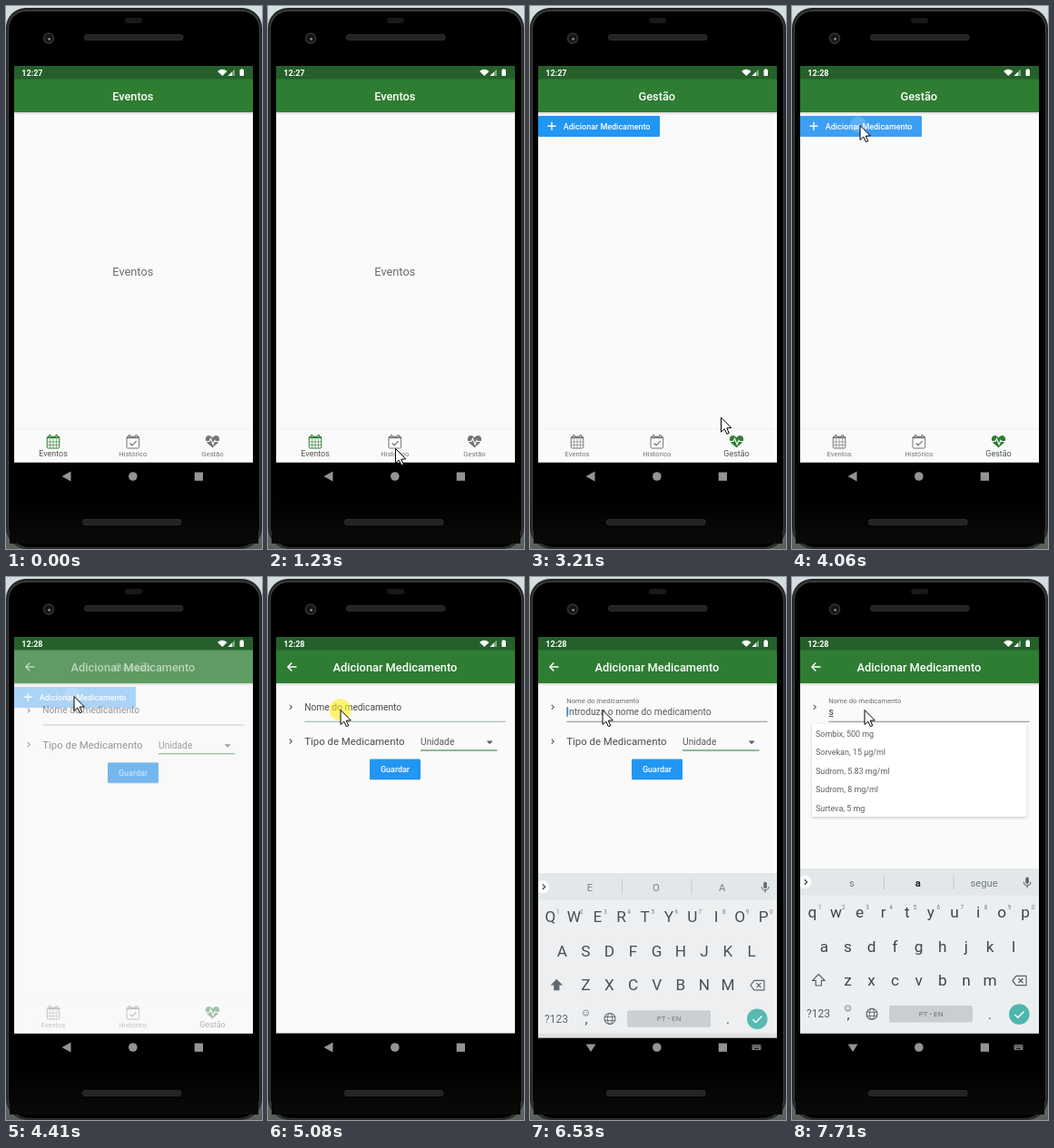
An HTML page with a canvas that plays this animation: 282 px wide and 598 px high, repeating every 8 s.

```html
<!DOCTYPE html>
<html lang="pt">
<head>
<meta charset="utf-8">
<title>Eventos</title>
<style>
html, body { margin: 0; width: 100%; height: 100%; overflow: hidden; background: #000; }
canvas { display: block; width: 282px; height: 598px; }
</style>
</head>
<body>
<canvas id="stage"></canvas>
<script>
const W = 282, H = 598, LOOP = 8000;
const canvas = document.getElementById('stage');
const ctx = canvas.getContext('2d');
const ratio = window.devicePixelRatio || 1;
canvas.width = W * ratio;
canvas.height = H * ratio;

const GREEN = '#2e7d32', PAGE = '#fafafa', BLUE = '#2196f3', GREY = '#757575';
const clamp = v => Math.max(0, Math.min(1, v));
const mix = (a, b, p) => a + (b - a) * p;
const span = (t, a, b) => clamp((t - a) / (b - a));
const easeOut = p => 1 - (1 - p) ** 3;
const easeInOut = p => p * p * (3 - 2 * p);

// ---------- drawing helpers ----------
function rect(x, y, w, h, color) {
  ctx.fillStyle = color;
  ctx.fillRect(x, y, w, h);
}
function round(x, y, w, h, r, color) {
  ctx.beginPath();
  ctx.roundRect(x, y, w, h, r);
  ctx.fillStyle = color;
  ctx.fill();
}
function disc(x, y, r, color) {
  ctx.beginPath();
  ctx.arc(x, y, r, 0, Math.PI * 2);
  ctx.fillStyle = color;
  ctx.fill();
}
function trace(points, close) {
  ctx.beginPath();
  points.forEach(([x, y]) => ctx.lineTo(x, y));
  if (close) ctx.closePath();
}
function poly(points, color) {
  trace(points, true);
  ctx.fillStyle = color;
  ctx.fill();
}
function line(points, color, width = 1) {
  trace(points);
  ctx.strokeStyle = color;
  ctx.lineWidth = width;
  ctx.stroke();
}
function ring(x, y, rx, ry, color, width = 1) {
  ctx.beginPath();
  ctx.ellipse(x, y, rx, ry, 0, 0, Math.PI * 2);
  ctx.strokeStyle = color;
  ctx.lineWidth = width;
  ctx.stroke();
}
function text(str, x, y, size, color, weight = 400, align = 'left') {
  ctx.font = `${weight} ${size}px Roboto, sans-serif`;
  ctx.textAlign = align;
  ctx.fillStyle = color;
  ctx.fillText(str, x, y);
}
function fade(x, y, w, h, from, to) {
  const g = ctx.createLinearGradient(0, y, 0, y + h);
  g.addColorStop(0, from);
  g.addColorStop(1, to);
  rect(x, y, w, h, g);
}
const chevron = (x, y, color, s = 2.5) =>
  line([[x - s / 2, y - s], [x + s / 2, y], [x - s / 2, y + s]], color, 1.2);

// ---------- phone ----------
function drawPhone() {
  fade(0, 0, W, H, '#d3dfe0', '#59605b');
  round(0, 2, 282, 596, [22, 22, 24, 24], '#262626');
  round(2, 4.5, 278, 592, [20, 20, 22, 22], '#3c403d');
  round(3, 6, 276, 590, [19, 19, 22, 22], '#000');
  fade(4, 540, 274, 52, '#000', '#0a0a0a');
  round(131, 13, 19, 6, 3, '#191919');
  for (const [x, y] of [[86, 31], [84, 565]]) {
    round(x, y, 109.5, 7, 3.5, '#2c2c2c');
    round(x + 1, y + 1, 107.5, 5, 2.5, '#232323');
  }
  disc(47, 35.5, 6.3, '#303030');
  disc(47, 35.5, 4.6, '#151515');
  disc(47.6, 36.4, 1.4, '#888');
}

function drawStatus(t) {
  rect(9, 66, 263, 14.5, '#255f2a');
  text(t < 3600 ? '12:27' : '12:28', 17.3, 76.6, 9, '#fff', 700);
  ctx.beginPath();
  ctx.moveTo(238.3, 77);
  ctx.arc(238.3, 77, 7.2, -Math.PI * 0.76, -Math.PI * 0.24);
  ctx.fillStyle = '#fff';
  ctx.fill();
  poly([[244.5, 77], [252, 69.5], [252, 77]], '#7fa582');
  poly([[244.5, 77], [249, 72.5], [249, 77]], '#fff');
  round(257.5, 70, 4.5, 7, 0.8, '#fff');
  rect(258.8, 69.2, 1.9, 1, '#fff');
}

function drawBar(title, x, align) {
  rect(9, 80, 263, 37, GREEN);
  fade(9, 117, 263, 3, 'rgba(0,0,0,.15)', 'rgba(0,0,0,0)');
  text(title, x, 103.7, 12.8, '#fff', 500, align);
}

function drawSystemNav(typing) {
  const c = '#949494';
  if (typing) {
    poly([[61.5, 514.5], [72.5, 514.5], [67, 523]], c);
    round(244.5, 515, 10, 6, 1, '#777');
    for (let i = 0; i < 4; i++) rect(245.6 + i * 2.3, 516.2, 1, 1, '#111');
    rect(247, 518.8, 5, 1, '#111');
  } else {
    poly([[61.5, 518], [71.5, 512.5], [71.5, 523.5]], c);
  }
  disc(139.8, 518, 4.8, c);
  rect(207.7, 513.5, 9.3, 9.3, c);
}

// ---------- tabs ----------
function calendar(x, y, color) {
  ctx.strokeStyle = color;
  ctx.lineWidth = 1;
  ctx.beginPath();
  ctx.roundRect(x - 6.8, y - 5.3, 13.6, 12.8, 1.2);
  ctx.stroke();
  rect(x - 6.8, y - 5.3, 13.6, 2, color);
  for (const dx of [-3.7, 3.7]) {
    round(x + dx - 1.3, y - 7.5, 2.6, 4, 1, color);
    rect(x + dx - 0.4, y - 6.6, 0.8, 2.2, '#ddd');
  }
}
function gridIcon(x, y, color) {
  calendar(x, y, color);
  for (const d of [-3.4, 0, 3.4]) line([[x + d, y - 3], [x + d, y + 7]], color, 0.6);
  for (const d of [0.5, 4]) line([[x - 6.5, y + d], [x + 6.5, y + d]], color, 0.6);
}
function checkIcon(x, y, color) {
  calendar(x, y, color);
  line([[x - 3.2, y + 2], [x - 0.8, y + 4.3], [x + 3.8, y - 0.4]], color, 1.2);
}
function heartIcon(x, y, color) {
  ctx.beginPath();
  ctx.moveTo(x, y + 7);
  ctx.bezierCurveTo(x - 4, y + 3, x - 8, y + 1, x - 7.6, y - 3);
  ctx.bezierCurveTo(x - 7, y - 7.5, x - 2, y - 7.5, x, y - 4);
  ctx.bezierCurveTo(x + 2, y - 7.5, x + 7, y - 7.5, x + 7.6, y - 3);
  ctx.bezierCurveTo(x + 8, y + 1, x + 4, y + 3, x, y + 7);
  ctx.fillStyle = color;
  ctx.fill();
  line([[x - 8, y], [x - 3.6, y], [x - 2, y - 3], [x + 0.6, y + 3.4], [x + 2.4, y - 1], [x + 3.2, y], [x + 8, y]], PAGE, 1.2);
}
const TABS = [
  { name: 'Eventos', x: 52, icon: gridIcon, from: -500, to: 1530 },
  { name: 'Histórico', x: 139.8, icon: checkIcon, from: 1530, to: 2740 },
  { name: 'Gestão', x: 227.5, icon: heartIcon, from: 2740, to: 9000 }
];

function drawTabs(t) {
  rect(9, 466, 263, 37, PAGE);
  rect(9, 465, 263, 1, '#f1f1f1');
  for (const tab of TABS) {
    const on = easeOut(span(t, tab.from, tab.from + 190)) - easeOut(span(t, tab.to, tab.to + 190));
    tab.icon(tab.x, 479.5, on > 0.5 ? GREEN : GREY);
    text(tab.name, tab.x, 496, mix(7.68, 8.96, on), on > 0.5 ? '#4d584e' : GREY, 400, 'center');
  }
}

function drawHome(t) {
  const tab = TABS.find(k => t >= k.from && t < k.to);
  rect(9, 80, 263, 423, PAGE);
  drawBar(tab.name, 139.8, 'center');
  if (tab.name === 'Gestão') {
    const pressed = t >= 4010;
    round(9, 121, 134, 23, 1, pressed ? '#3c9ff4' : BLUE);
    if (pressed) disc(73, 130.5, mix(4, 9, span(t, 4000, 4060)), 'rgba(255,255,255,.18)');
    line([[19.5, 132.3], [28.5, 132.3]], '#fff', 1.4);
    line([[24, 127.8], [24, 136.8]], '#fff', 1.4);
    text('Adicionar Medicamento', 36.8, 135.5, 8.96, '#fff', 500);
  } else {
    text(tab.name, 139.8, 296.8, 12.8, '#667068', 400, 'center');
  }
  drawTabs(t);
}

// ---------- form ----------
const MEDICINES = ['Sombix, 500 mg', 'Sorvekan, 15 µg/ml', 'Sudrom, 5.83 mg/ml', 'Sudrom, 8 mg/ml', 'Surteva, 5 mg'];

function drawForm(t, slide) {
  rect(9, 80, 263, 423, PAGE);
  ctx.save();
  ctx.translate(0, slide);
  drawNameField(t);
  drawTypeField();
  if (t >= 7520) drawOptions();
  ctx.restore();

  drawBar('Adicionar Medicamento', 71.6, 'left');
  line([[31.5, 99], [22, 99]], '#fff', 1.4);
  line([[26.3, 94.5], [21.8, 99], [26.3, 103.5]], '#fff', 1.4);
}

function drawNameField(t) {
  const float = easeInOut(span(t, 5560, 5860));
  const typed = t >= 7270;
  chevron(25, 143.3, '#666');
  text('Nome do medicamento', 40.2, mix(146.8, 139.4, float), mix(10.24, 7.68, float), float < 0.5 ? '#4c4c4c' : '#6c6c6c');
  rect(40.5, 158.7, 221, 1.3, t < 5810 ? '#a9c0ab' : '#a0a0a0');
  if (typed) {
    text('s', 40.6, 152, 10.24, '#333');
    rect(40.6, 153, 5, 0.8, '#333');
  } else if (t >= 5630) {
    ctx.save();
    ctx.globalAlpha *= float;
    text('Introduza o nome do medicamento', 40.2, 152, 10.24, '#5a5a5a');
    ctx.restore();
  }
  const caret = (t >= 5390 && t < 6130) || (t >= 6460 && t < 7120) || (typed && t < 7710);
  if (caret) rect(typed ? 45.4 : 40.3, 143, 1.4, 11, '#4a7fe0');
}

function drawTypeField() {
  chevron(25, 181, '#666');
  text('Tipo de Medicamento', 40.2, 185.3, 11.4, '#4c4c4c');
  text('Unidade', 168, 185, 10.24, '#5a5a5a');
  poly([[240.8, 180.5], [247.6, 180.5], [244.2, 184]], '#555');
  rect(168, 190.3, 84.5, 1.3, '#5f8f62');
  round(112, 201.5, 56, 22.5, 1.2, 'rgba(0,0,0,.14)');
  round(112, 200.5, 56, 22.5, 1.2, BLUE);
  text('Guardar', 140, 215, 8.96, '#fff', 500, 'center');
}

function drawOptions() {
  ctx.save();
  ctx.shadowColor = 'rgba(0,0,0,.22)';
  ctx.shadowBlur = 3 * ratio;
  ctx.shadowOffsetY = ratio;
  round(22, 162, 236.5, 102, 1, '#fff');
  ctx.restore();
  MEDICINES.forEach((name, i) => text(name, 26, 175.7 + i * 20.5, 8.96, '#606060'));
}

// ---------- keyboard ----------
const INK = '#3c474c', PITCH = 26.1;
const ROWS = [['qwertyuiop', 22.3, 375], ['asdfghjkl', 35.3, 412.6], ['zxcvbnm', 61.4, 450]];

function drawKeyboard(t) {
  const p = span(t, 6430, 6620);
  const drop = 36 * (1 - p) ** 2.6;
  const lower = t >= 7350;
  ctx.save();
  ctx.globalAlpha = clamp(1.05 - drop / 50);
  ctx.translate(0, drop);
  rect(9, 321, 263, 181.5, '#eceff1');
  rect(9, 321, 263, 29.5, '#e2e7ea');

  const words = t >= 7440 ? ['s', 'a', 'segue'] : ['E', 'O', 'A'];
  words.forEach((word, i) => {
    const main = word === 'a';
    text(word, 66 + i * 72.8, 340.6, 11.2, main ? '#222' : '#737b80', main ? 700 : 400, 'center');
  });
  for (const x of [101, 177.5]) rect(x, 328, 1, 16, '#c3c9cc');
  ctx.save();
  ctx.beginPath();
  ctx.rect(9, 321, 30, 30);
  ctx.clip();
  disc(14.2, 336, 7.2, '#fff');
  ctx.restore();
  chevron(15.2, 336, '#333', 2.8);
  round(257.2, 330.5, 3.8, 7.4, 1.9, '#5f686d');
  ctx.beginPath();
  ctx.arc(259.1, 335.8, 3.9, 0, Math.PI);
  ctx.strokeStyle = '#5f686d';
  ctx.lineWidth = 1.1;
  ctx.stroke();
  rect(258.5, 339.5, 1.2, 2.8, '#5f686d');

  for (const [keys, x, y] of ROWS) {
    [...keys].forEach((k, i) =>
      text(lower ? k : k.toUpperCase(), x + i * PITCH, y, 17.2, INK, 400, 'center'));
  }
  for (let i = 0; i < 10; i++) {
    text((i + 1) % 10, 30.8 + i * PITCH, 366.2, 6.4, '#727b80', 400, 'center');
  }

  const shift = [[29.3, 437.5], [36, 444.4], [32.4, 444.4], [32.4, 450], [26.2, 450], [26.2, 444.4], [22.6, 444.4]];
  if (lower) line([...shift, shift[0]], '#566167', 1.2);
  else poly(shift, '#566167');
  line([[242.8, 444.5], [247, 439.3], [258, 439.3], [258, 449.7], [247, 449.7], [242.8, 444.5]], '#566167', 1.2);
  line([[249.5, 442], [254.5, 447]], '#566167', 1.2);
  line([[254.5, 442], [249.5, 447]], '#566167', 1.2);

  text('?123', 29, 485.4, 12, '#566167', 400, 'center');
  text(',', 62, 486.5, 15, INK, 400, 'center');
  ring(61.5, 475, 3.2, 3.2, '#727b80', 0.8);
  rect(60, 473.8, 0.9, 0.9, '#727b80');
  rect(62.2, 473.8, 0.9, 0.9, '#727b80');
  line([[60, 476.2], [61.5, 477], [63, 476.2]], '#727b80', 0.7);
  ring(88, 481.3, 6, 6, '#566167', 1.1);
  ring(88, 481.3, 2.7, 6, '#566167', 0.9);
  line([[82.5, 479.3], [93.5, 479.3]], '#566167', 0.9);
  line([[82.5, 483.3], [93.5, 483.3]], '#566167', 0.9);
  round(107, 472, 92, 18.5, 2, '#c9ced1');
  text('PT • EN', 153, 484, 8, '#6a7377', 400, 'center');
  text('.', 218, 486.5, 15, INK, 400, 'center');
  disc(250.3, 481.6, 11.3, '#4db6ac');
  line([[245.4, 482], [248.8, 485.3], [255.5, 478.4]], '#fff', 1.5);
  ctx.restore();
}

// ---------- pointer ----------
const PATH = [
  [450, 208, 599], [800, 166, 528], [1060, 137, 489], [1230, 140, 487],
  [1740, 140, 487], [2050, 212, 481], [2080, 214, 481], [2240, 220, 481],
  [3150, 220, 481], [3480, 165, 325], [3860, 77, 136], [3980, 74.5, 131],
  [4740, 74.5, 131], [5050, 79.5, 146]
];
const CLICKS = [[1290, 1440], [2420, 2570], [3910, 4010], [5040, 5210]];

function pointerAt(t) {
  const i = PATH.findIndex(k => k[0] > t);
  if (i < 0) return PATH[PATH.length - 1].slice(1);
  if (i === 0) return [0, -99];
  const [a, x0, y0] = PATH[i - 1], [b, x1, y1] = PATH[i];
  const p = span(t, a, b);
  return [mix(x0, x1, p), mix(y0, y1, p)];
}

function drawPointer(t) {
  const [x, y] = pointerAt(t);
  if (CLICKS.some(([a, b]) => t >= a && t < b)) disc(x, y, 12, 'rgba(255,240,20,.58)');
  const arrow = [[0, 0], [0, 16], [3.7, 12.6], [6.4, 18.2], [8.8, 17.2], [6.2, 11.7], [11.3, 11.4]];
  poly(arrow.map(([dx, dy]) => [x + 0.5 + dx, y + 0.5 + dy]), '#fff');
  ctx.strokeStyle = '#000';
  ctx.lineWidth = 1;
  ctx.stroke();
}

// ---------- scene ----------
function draw(t) {
  ctx.setTransform(ratio, 0, 0, ratio, 0, 0);
  drawPhone();
  ctx.save();
  ctx.beginPath();
  ctx.rect(9, 80, 263, 422.5);
  ctx.clip();
  const open = span(t, 4300, 4500);
  if (open < 1) drawHome(t);
  if (open > 0) {
    ctx.globalAlpha = easeInOut(open);
    drawForm(t, 40 * (1 - easeOut(open)));
  }
  ctx.restore();
  drawStatus(t);
  if (t >= 6460) drawKeyboard(t);
  drawSystemNav(t >= 5810);
  drawPointer(t);
}

let start;
function tick(now) {
  start ??= now;
  draw((now - start) % LOOP);
  requestAnimationFrame(tick);
}
draw(0);
requestAnimationFrame(tick);
</script>
</body>
</html>
```
